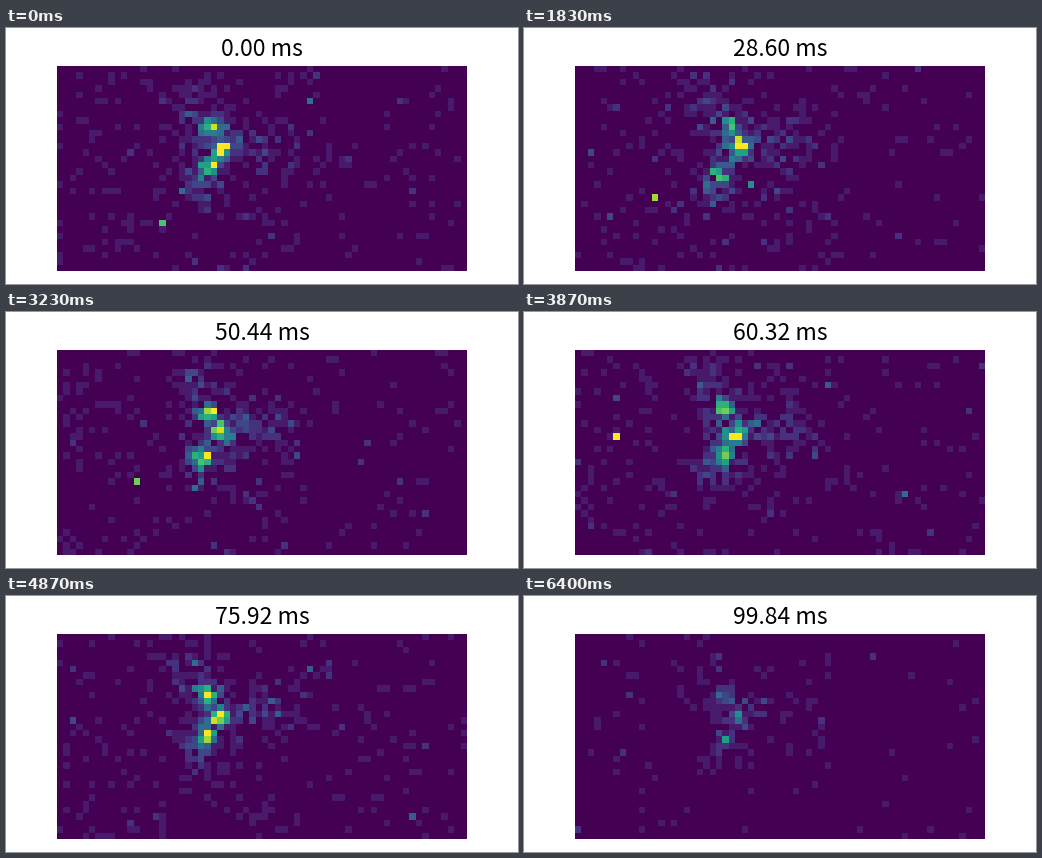
Recreate the animation shown at these times as a matplotlib script. Size 512 px wide and 256 px high, loop 6430 ms.

```python
import numpy as np
import matplotlib.pyplot as plt
from matplotlib.animation import FuncAnimation

W, H, DPI = 512, 256, 100
COLS, ROWS = 64, 32
TICK_MS, TICKS = 10, 643  # the picture changes 30 times a second, on a 10 ms grid
STEPS, BIN_MS = 193, 0.52
VMAX = 14

x, y = np.meshgrid(np.arange(COLS), np.arange(ROWS))


def blob(cx, cy, sx, sy, amp):
    return amp * np.exp(-((x - cx) / sx) ** 2 / 2 - ((y - cy) / sy) ** 2 / 2)


def background():
    """Sparse noise, denser on the left, with a soft cloud around the cores."""
    noise = 0.06 + 0.07 / (1 + np.exp((x - 38) / 4))
    arms = blob(20, 6, 1.8, 2.4, 1.1) + blob(21, 18, 1.6, 1.8, 2.0)
    right = blob(27.5, 11.5, 2, 1.3, 1.9) + blob(33.5, 12, 2.6, 2.8, 0.9)
    return noise + arms + right + blob(23.5, 12.5, 2.5, 4.4, 1.3)


def core(rng, cx, cy, amp):
    """Bright spot that trembles a little around its place."""
    dx, dy = rng.normal(0, 0.25, 2)
    return blob(cx + dx, cy + dy, 0.9, 0.85, amp)


CLOUD = background()

# Cells that flash now and then
cells = np.random.default_rng(3)
blink_cols = cells.integers(0, COLS, 16)
blink_rows = cells.integers(0, ROWS, 16)


def counts(step):
    rng = np.random.default_rng(500 + step)
    rate = (CLOUD + core(rng, 23.1, 9.2, 12) + core(rng, 25.1, 12.5, 15)
            + core(rng, 22.7, 15.7, 11))
    rate[blink_rows, blink_cols] += rng.gamma(0.3, 4, 16)
    if 20 <= step < 110:
        rate[20, 12] += 14  # one cell stays lit for a while
    if step == STEPS - 1:
        rate *= 0.35  # the last bin is cut short
    return rng.poisson(rate)


fig = plt.figure(figsize=(W / DPI, H / DPI), dpi=DPI, facecolor="white")
ax = fig.add_axes([0.1, 0.05, 0.8, 0.8])
ax.axis("off")
image = ax.imshow(counts(0), cmap="viridis", vmin=0, vmax=VMAX,
                  interpolation="nearest", aspect="auto")
title = fig.text(0.5, 1 - 28 / H, "", fontname="Noto Sans CJK JP", fontsize=16.6,
                 color="black", ha="center", va="baseline")


def update(tick):
    step = (6 * tick + 3) // 20
    image.set_data(counts(step))
    title.set_text(f"{step * BIN_MS:.2f} ms")
    return image, title


anim = FuncAnimation(fig, update, frames=TICKS, interval=TICK_MS,
                     repeat=True, repeat_delay=0, blit=False)
plt.show()
```
